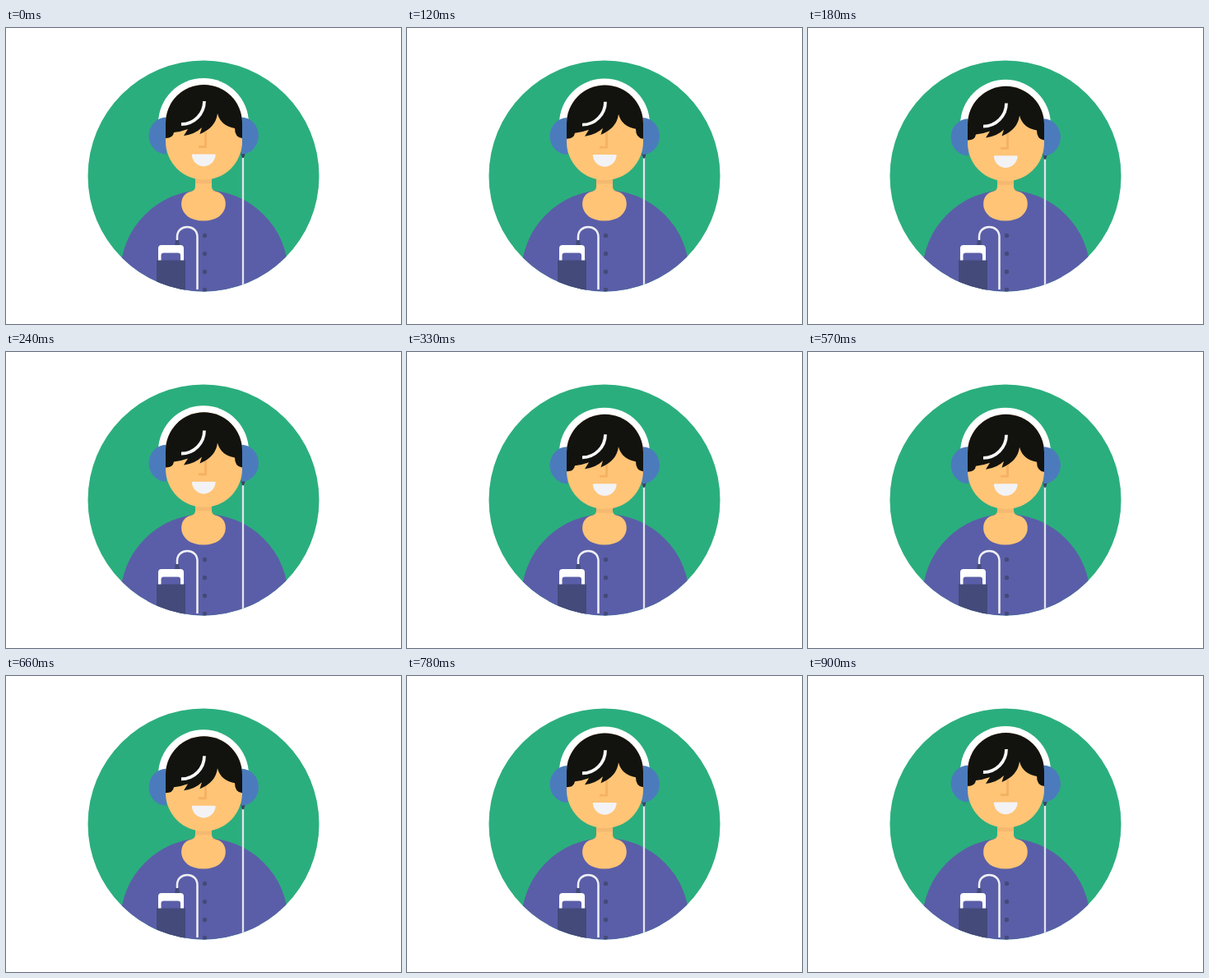
An HTML page that plays this animation: 480 by 360 pixels, repeating every 0.93 s.

```html
<!DOCTYPE html>
<html lang="en">
<head>
<meta charset="utf-8">
<title>Listening to music</title>
<style>
  html, body { margin: 0; width: 100%; height: 100%; overflow: hidden; background: #fff; }
  svg { display: block; }
</style>
</head>
<body>
<svg width="480" height="360" viewBox="0 0 480 360" fill="none">
  <clipPath id="stage"><circle cx="240" cy="180" r="140.5"/></clipPath>
  <clipPath id="skull"><rect x="194" y="69" width="93" height="115.5" rx="46.5"/></clipPath>

  <g clip-path="url(#stage)">
    <path fill="#2bae7d" d="M99 39H381V321H99Z"/>
    <circle cx="241" cy="299" r="102" fill="#5a5ea8"/>

    <!-- neck and collar -->
    <path fill="#ffc476" d="M230 178V193Q230 198 224 199C208 202 207 234.500 240 234.500C273 234.500 272 202 256 199Q250 198 250 193V178Z"/>

    <!-- buttons, player and pocket -->
    <g fill="#444a7a">
      <circle cx="241.500" cy="252.500" r="2.700"/>
      <circle cx="241.500" cy="274.500" r="2.700"/>
      <circle cx="241.500" cy="296.500" r="2.700"/>
      <circle cx="241.500" cy="318.500" r="2.700"/>
      <path d="M206 257H210L211 265H205Z"/>
    </g>
    <path stroke="#f0f0f5" stroke-width="2.500" d="M208 258V254C208 238 232.500 238 232.500 254V318"/>
    <rect x="185" y="264" width="31" height="30" rx="4" fill="#fff"/>
    <rect x="188.500" y="273.500" width="23.500" height="16" rx="3" fill="#5a5ea8"/>
    <path fill="#444a7a" d="M183 282.500H218V321H183Z"/>

    <g id="head">
      <path fill="#f5b870" d="M230 178H250V189H230Z"/>
      <path stroke="#e4e3ee" stroke-width="2.300" d="M288 156V330"/>
      <path fill="#3c4166" d="M285 151.500H291L289 158H287Z"/>
      <path fill="#fff" d="M185 116A55 55 0 0 1 295 116Z"/>
      <path fill="#4b7bbd" d="M195 108.500A21.500 22.500 0 0 0 195 153.500ZM286 108.500A21 22.500 0 0 1 286 153.500Z"/>
      <g clip-path="url(#skull)">
        <path fill="#ffc476" d="M194 69H287V185H194Z"/>
        <path stroke="#f5b263" stroke-width="2.800" d="M242.500 126V144.500H234"/>
        <path fill="#f3f3f6" d="M227 153.500H253.500Q255 153.500 254.700 155C252 172.500 228.500 172.500 225.800 155Q225.500 153.500 227 153.500Z"/>
        <g id="fringe">
          <path fill="#12130f" d="M194 50H287V134Q278 133 278 122Q261 119 257 104Q255 121 235.500 129L238 121Q230 129 216 131L221 123Q213 126 204 127Q203 134 194 134Z"/>
          <path stroke="#f8f8f8" stroke-width="3.800" d="M241 89A28 28 0 0 1 213 117"/>
        </g>
      </g>
    </g>
  </g>
</svg>
<script>
  const LOOP = 930, STEP = 30, HALF = 450;
  const head = document.getElementById('head');
  const fringe = document.getElementById('fringe');

  const ease = u => u < 0.5 ? 4 * u ** 3 : 1 - 4 * (1 - u) ** 3;

  // 0 at rest, 1 at the lowest point of the nod
  function nod(ms) {
    const u = Math.min(Math.max(ms / HALF, 0), 2);
    return ease(u < 1 ? u : 2 - u);
  }

  const shift = (el, y) => el.setAttribute('transform', `translate(0 ${y.toFixed(2)})`);

  function draw(now) {
    const t = Math.floor(now % LOOP / STEP) * STEP;
    const headY = 7.2 * nod(t);
    shift(head, headY);
    // the fringe swings further than the head and a little later
    shift(fringe, 12.5 * nod(t - 12) - headY);
    requestAnimationFrame(draw);
  }
  draw(0);
</script>
</body>
</html>
```
